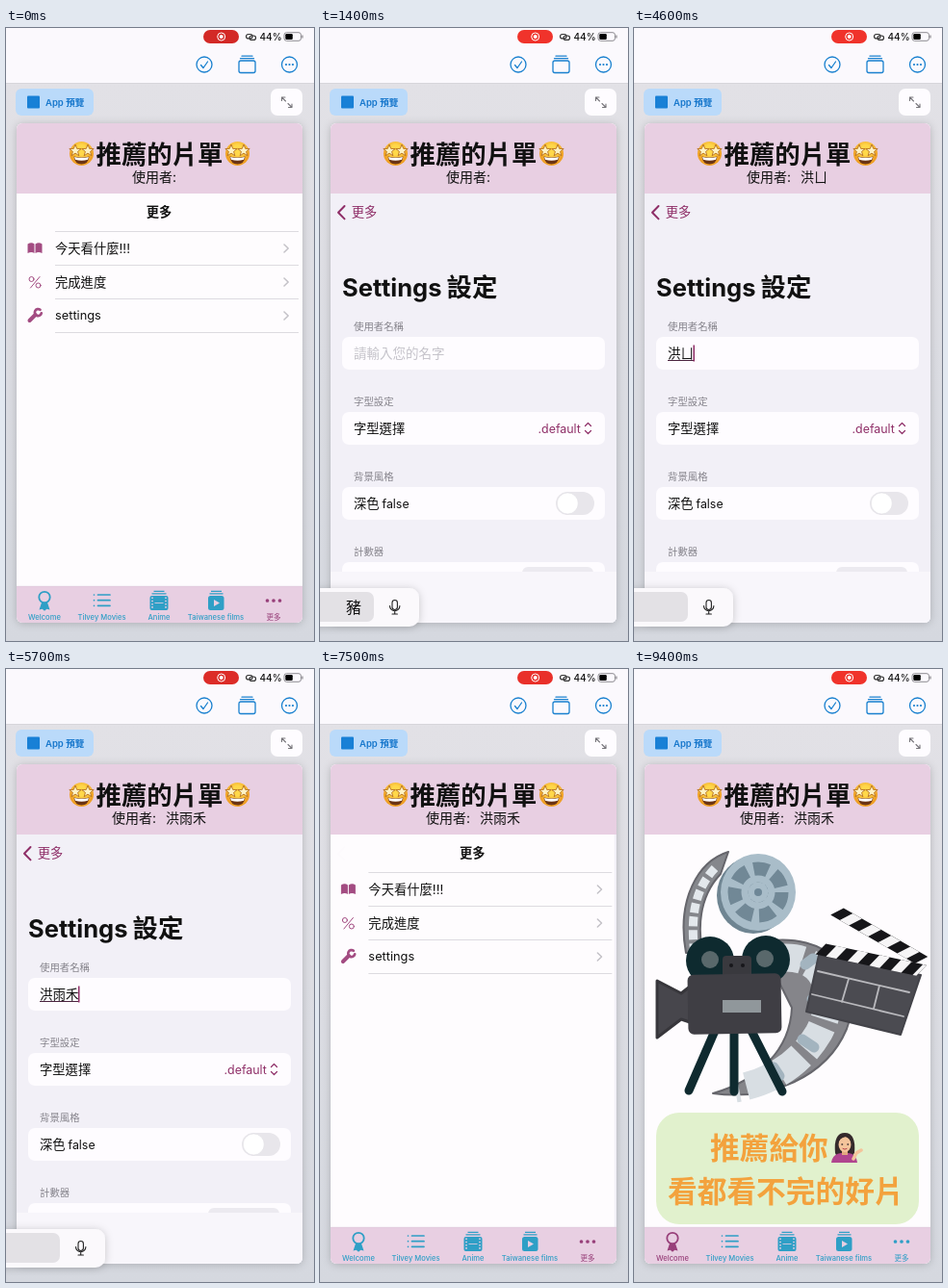
Animation, 320 px wide and 637 px high, one loop 9500 ms. Source, as an HTML page:

```html
<!DOCTYPE html>
<html lang="zh-Hant">
<head>
<meta charset="utf-8">
<title>App preview</title>
<style>
html, body { margin: 0; width: 100%; height: 100%; overflow: hidden; background: #fbf9fd; }
svg { display: block; width: 100%; height: 100%; }
text { font: 13.3px Inter, "Noto Sans CJK TC", "Noto Sans CJK", sans-serif; white-space: pre; fill: #111; }
.mid { text-anchor: middle; }
.line { stroke-linecap: round; stroke-linejoin: round; }
.line:not([fill]) { fill: none; }
.title { font-size: 26.4px; font-weight: 700; }
.label { font-size: 10.4px; fill: #85838b; }
.latin { font-size: 12.4px; }
.mauve { fill: #8f2f68; }
.tab text { font-size: 7.6px; font-weight: 500; fill: currentColor; text-anchor: middle; }
.tab { color: #2f9fc6; }
.tab.on { color: #98407a; }
.promo { font-size: 30.7px; font-weight: 700; fill: #f3a23d; }
.pick { font-size: 16px; }
</style>
</head>
<body>
<svg viewBox="0 0 320 637" preserveAspectRatio="none">
<defs>
  <linearGradient id="desk" x2="0" y2="1"><stop stop-color="#e2e1e6"/><stop offset="1" stop-color="#d5d8df"/></linearGradient>
  <radialGradient id="skin" cy=".35"><stop offset=".4" stop-color="#ffd84a"/><stop offset="1" stop-color="#f0a126"/></radialGradient>
  <filter id="soft" x="-20%" y="-20%" width="140%" height="140%"><feDropShadow dx="0" dy="1" stdDeviation="4" flood-opacity=".2"/></filter>
  <clipPath id="card"><rect x="11" y="99" width="297" height="519" rx="6"/></clipPath>
  <clipPath id="pickArea"><rect y="586" width="56" height="31"/></clipPath>
  <polygon id="star" points="0,-6.500 1.700,-2.100 6.200,-2 2.600,.9 3.800,5.200 0,2.600 -3.800,5.200 -2.600,.9 -6.200,-2 -1.700,-2.100" fill="#fff3c4" stroke="#b56f1d" stroke-width=".9"/>
  <g id="wow">
    <circle r="12.500" fill="url(#skin)"/>
    <path d="M-8 3Q0 5 8 3Q7 11 0 11Q-7 11-8 3Z" fill="#6b3413"/>
    <path d="M-7.400 3.400Q0 5.300 7.400 3.400L6.600 6.300Q0 8-6.600 6.300Z" fill="#fff"/>
    <use href="#star" x="-6.500" y="-3"/><use href="#star" x="6.500" y="-3"/>
  </g>
  <path id="next" d="M289 -4l4.200 4-4.200 4" class="line" stroke="#c3c1c7" stroke-width="1.500"/>
</defs>

<rect width="320" height="637" fill="#fbf9fd"/>
<rect y="57" width="320" height="580" fill="url(#desk)"/>
<rect y="57" width="320" height=".7" fill="#d3d1d7"/>

<rect id="rec" x="205" y="2" width="37" height="14" rx="7"/>
<circle cx="223.700" cy="9" r="4" fill="none" stroke="#fff"/><circle cx="223.700" cy="9" r="2" fill="#fff"/>
<g class="line" fill="none" stroke="#333" stroke-width="1.200"><rect x="249.500" y="6.500" width="6.500" height="4.400" rx="2.200"/><rect x="253" y="8" width="6.500" height="4.400" rx="2.200"/></g>
<text x="263.500" y="13" style="font-size:10px;font-weight:500">44%</text>
<rect x="289" y="4.700" width="17.500" height="8.600" rx="2.500" fill="none" stroke="#8e8c92"/>
<rect x="290.300" y="6" width="7.500" height="6" rx="1.200"/><path d="M308 7.500v3" stroke="#8e8c92" stroke-width="1.300"/>

<g class="line" stroke="#1880cf" stroke-width="1.300">
  <circle cx="206" cy="38" r="8"/><path d="M202.500 38.500l2.500 3 4.500-6.500"/>
  <rect x="242" y="34" width="17" height="12.500" rx="2"/><path d="M243.500 31.700h14M245 29.200h11"/>
  <circle cx="294.500" cy="38" r="8"/><path d="M291 38h0M294.500 38h0M298 38h0" stroke-width="2.200"/>
</g>
<rect x="10" y="63" width="81" height="28" rx="6" fill="#badafa"/>
<rect x="22" y="70.500" width="13" height="13" rx="1" fill="#1880d6"/>
<text x="41" y="81" style="font-size:9.500px;font-weight:600;fill:#1777cc">App 預覽</text>
<rect x="275" y="63" width="33" height="28" rx="7" fill="#fefcff"/>
<path class="line" d="M290.500 76l-4-4M286.500 75.500v-3.500h3.500M293 78.500l4 4M297 79v3.500h-3.500" stroke="#77757b" stroke-width="1.100"/>

<rect x="11" y="99" width="297" height="519" rx="6" fill="#fefcfe" filter="url(#soft)"/>
<g clip-path="url(#card)">
  <rect x="11" y="172" width="297" height="408" fill="#fefcfe"/>
  <g id="more">
    <path d="M51 211.500H304M51 246.500H304M51 281.500H304M51 316.500H304" stroke="#dddbe0"/>
    <text x="51" y="233.700">今天看什麼!!!</text><text x="51" y="268.700">完成進度</text>
    <text x="51" y="303.300" style="font-size:12.800px">settings</text>
    <use href="#next" y="229"/><use href="#next" y="264"/><use href="#next" y="299"/>
    <path d="M22.500 224.500q4-2.500 7 0v9.500q-3-2-7 0zM30.500 224.500q3.500-2.500 7 0v9.500q-4-2-7 0z" fill="#a34c82"/>
    <g class="line" stroke="#a34c82"><path d="M35 258.500l-9.500 11.500"/><circle cx="26.500" cy="261" r="2.500"/><circle cx="33.500" cy="267.500" r="2.500"/>
      <path d="M24.500 304l6-6" stroke-width="4"/><path d="M35.500 292.800a3.500 3.500 0 1 0 1.300 3.500" stroke-width="2.700"/></g>
  </g>
  <rect id="dim" x="11" y="172" width="297" height="408"/>

  <g id="settings">
    <rect x="11" y="172" width="297" height="446" fill="#f2f0f7"/>
    <text class="title" x="23" y="278.500"><tspan style="font-size:25.500px">Settings</tspan></text>
    <text class="title" x="131.500" y="278.500">設定</text>
    <g fill="#fefcff"><rect x="23" y="321" width="273" height="34" rx="7"/><rect x="23" y="399" width="273" height="34" rx="7"/>
      <rect x="23" y="477" width="273" height="34" rx="7"/><rect x="23" y="555" width="273" height="34" rx="7"/></g>
    <text class="label" x="35" y="313.700">使用者名稱</text><text class="label" x="35" y="391.700">字型設定</text>
    <text class="label" x="35" y="469.700">背景風格</text><text class="label" x="35" y="547.700">計數器</text>
    <text id="field" x="35" y="343"></text>
    <path id="mark" stroke="#4b2440"/>
    <rect id="caret" y="329.500" width="1.500" height="17" fill="#8f2f68"/>
    <text x="35" y="420.800">字型選擇</text><text class="mauve latin" x="226.500" y="420.500">.default</text>
    <path class="line" d="M275.500 413.500l3-3 3 3M275.500 418.500l3 3 3-3" stroke="#8f2f68" stroke-width="1.200"/>
    <text x="35" y="498.800">深色</text><text class="latin" x="64.500" y="498.500">false</text>
    <rect x="245" y="482" width="40" height="24" rx="12" fill="#e8e6eb"/><circle cx="257.300" cy="494" r="11" fill="#fff" stroke="#dad8de" stroke-width=".5"/>
    <rect x="210" y="560" width="74" height="24" rx="6" fill="#eceaf0"/>
  </g>
  <rect id="shade" x="11" y="565" width="297" height="53" fill="#f8f6fb"/>
  <g id="back">
    <path id="arrow" class="line" d="M25.500 185l-6.500 6.700 6.500 6.700" stroke="#8f2f68" stroke-width="2"/>
    <text id="backDark" class="mid" y="196" style="font-weight:600">更多</text><text id="backTint" class="mid mauve" y="196.300">更多</text>
  </g>

  <g id="welcome">
    <rect x="11" y="172" width="297" height="408" fill="#fefcfe"/>
    <g class="line">
      <path d="M98 190C66 200 44 240 54 295L71 295C65 260 72 232 90 213Z" fill="#85878c" stroke="#66666c" stroke-width="2"/>
      <path d="M84 207C64 228 58 256 63 296" stroke="#e3e8ec" stroke-width="9" stroke-dasharray="10 4" stroke-linecap="butt"/>
      <path d="M130 284C205 270 242 320 221 374C200 424 142 449 82 441C130 427 162 396 164 352Z" fill="#85858a" stroke="#66666c" stroke-width="2"/>
      <path d="M146 301C200 293 213 338 192 378C172 412 140 430 105 436" stroke="#d8dee3" stroke-width="29" stroke-dasharray="29 8" stroke-linecap="butt"/>
      <path d="M178 307l8-6M185 343l16 4M175 385l12 8M145 414l6 9" stroke="#a3b4bf" stroke-width="11"/>
    </g>
    <ellipse cx="124" cy="235" rx="38" ry="40" fill="#6f8592"/><ellipse cx="129" cy="232" rx="39" ry="40" fill="#a9bdc9"/>
    <circle cx="129" cy="232" r="21" fill="none" stroke="#718896" stroke-width="21" stroke-dasharray="13 5.850"/>
    <circle cx="129" cy="232" r="14" fill="none" stroke="#a9bdc9" stroke-width="7"/>
    <circle cx="129" cy="232" r="4" fill="#6e8797"/>
    <path class="line" d="M84 376L57 438M104 376V439M122 376L154 439" stroke="#0f2a2f" stroke-width="9"/>
    <path class="line" d="M24 324L49 337 58 330V367L49 364 24 383Z" fill="#47464c" stroke="#37363b" stroke-width="3"/>
    <circle cx="79" cy="303" r="25" fill="#0e2a2f"/><circle cx="137" cy="302" r="25" fill="#0e2a2f"/>
    <rect x="92" y="298" width="30" height="25" rx="4" fill="#39393e"/>
    <rect x="56" y="317" width="97" height="62" rx="6" fill="#3f3e44" transform="rotate(-1 104 348)"/>
    <g fill="#59686b"><circle cx="79" cy="302" r="9"/><circle cx="136" cy="301" r="9"/></g>
    <g fill="#17171b"><circle cx="101" cy="308" r="2"/><circle cx="113" cy="308" r="2"/></g>
    <rect x="92" y="344" width="40" height="13" fill="#90979b"/>
    <path class="line" d="M192 297L298 318 277 380 179 356Z" fill="#4b4b51" stroke="#434349" stroke-width="2"/>
    <path class="line" d="M191 314L286 336M185 338L280 361M223 322L216 346M255 329L249 353" stroke="#b9b9bd" stroke-width="1.800"/>
    <g id="clapper"></g>
    <rect x="23" y="461" width="273" height="116" rx="24" fill="#e1f1cd"/>
    <text class="promo" x="79" y="508.500">推薦給你</text><text class="promo" x="35" y="553.500">看都看不完的好片</text>
    <g transform="translate(219 497)">
      <path d="M-10 6Q-12-15 0-15 12-15 10 6L7 10H-8Z" fill="#352a2c"/>
      <path d="M-14 16Q-13 7-4 6H4Q12 7 13 16Z" fill="#b0458f"/>
      <rect x="-3" y="1" width="6" height="7" fill="#e3aa80"/><ellipse cy="-3" rx="6.500" ry="8" fill="#f4c49b"/>
      <path d="M-7-3Q-6-10 1-11 6-9 7-3L8-10 0-14-8-9Z" fill="#352a2c"/>
      <path class="line" d="M-3-3h.5M3-3h.5" stroke="#352a2c" stroke-width="1.500"/><path class="line" d="M-2 1.500q2 1.500 4 0" stroke="#b8434a"/>
      <path class="line" d="M9 12L12 6 17 3" stroke="#f4c49b" stroke-width="3.500"/>
    </g>
  </g>

  <g id="tabFill"><rect x="11" y="580" width="297" height="38" fill="#e8cfe2"/><path d="M11 580.200H308" stroke="#d9c4d5" stroke-width=".5"/></g>
  <g id="tabs">
    <g class="tab" id="tabHome"><path class="line" d="M37 597l-2.500 7.500 3.200-.8 2.300 2 2.300-2 3.200.8L43 597" fill="currentColor"/>
      <circle cx="40" cy="591.500" r="5.700" fill="none" stroke="currentColor" stroke-width="1.800"/><text x="40" y="614.700">Welcome</text></g>
    <g class="tab"><path class="line" d="M95.500 589H108M95.500 594.700H108M95.500 600.300H108M91.500 589h0M91.500 594.700h0M91.500 600.300h0" stroke="currentColor" stroke-width="1.700"/><text x="99.500" y="614.700">Tilvey Movies</text></g>
    <g class="tab"><path d="M153.500 585.300h11M151.500 587.900h15" stroke="currentColor" stroke-width="1.200"/><rect x="149.500" y="590" width="19" height="15" rx="2" fill="currentColor"/>
      <path d="M152 591.500v12M166 591.500v12" stroke="#e8cfe2" stroke-width="1.500" stroke-dasharray="1.600 1.600"/><path d="M154.500 597.500h9" stroke="#e8cfe2" stroke-width=".8"/><text x="159" y="614.700">Anime</text></g>
    <g class="tab"><path d="M213 585.300h11M211.500 587.900h14" stroke="currentColor" stroke-width="1.200"/><rect x="210" y="590" width="16.500" height="15" rx="2.500" fill="currentColor"/>
      <path d="M216 594l6 3.500-6 3.500z" fill="#e8cfe2"/><text x="218" y="614.700">Taiwanese films</text></g>
    <g class="tab" id="tabMore"><path class="line" d="M271.500 595h0M278 595h0M284.500 595h0" stroke="currentColor" stroke-width="3.700"/><text x="278" y="614.900">更多</text></g>
  </g>

  <rect x="11" y="99" width="297" height="73" fill="#e8cfe2"/>
  <use href="#wow" x="78.500" y="130.500"/><use href="#wow" x="240.500" y="130.500"/>
  <text class="title mid" x="159.500" y="140.500">推薦的片單</text>
  <text id="userLabel" y="160" style="font-size:14px">使用者:</text><text id="userName" y="160" style="font-size:14px"></text>
</g>

<g id="bar">
  <g id="barFill"><rect x="-20" y="582" width="123" height="40" rx="10" fill="#fbf9fc" filter="url(#soft)"/>
    <rect x="-10" y="586" width="66" height="31" rx="7" fill="#e3e1e5"/></g>
  <g clip-path="url(#pickArea)"><text id="pick1" class="pick" y="608"></text><text id="pick2" class="pick" x="41" y="608" fill-opacity=".7"></text></g>
  <rect x="75" y="594.500" width="5.400" height="10" rx="2.700" fill="none" stroke="#222" stroke-width="1.100"/>
  <path class="line" d="M72.500 600.500a5.200 5.200 0 0 0 10.400 0M77.700 606v3M75 609h5.400" stroke="#222" stroke-width="1.100"/>
</g>
</svg>
<script>
const LOOP = 9500, WIDTH = 297;
const $ = id => document.getElementById(id);
const set = (id, attrs) => { for (const k in attrs) $(id).setAttribute(k, attrs[k]); };
const write = (id, s) => { if ($(id).textContent !== s) $(id).textContent = s; };
const clamp = x => Math.min(1, Math.max(0, x));
const ramp = (t, start, length) => clamp((t - start) / length);
const ease = x => x < .5 ? 2 * x * x : 1 - 2 * (1 - x) ** 2;
const mix = (a, b, k) => a + (b - a) * k;

const typed = [[600, ''], [2400, 'ㄏ'], [3100, 'ㄏㄨ'], [3400, 'ㄏㄨㄥ'], [3800, '洪'], [4400, '洪ㄩ'],
  [4900, '洪雨'], [5200, '洪雨ㄏ'], [5400, '洪雨ㄏㄜ'], [5600, '洪雨禾'], [5800, '洪雨禾']];
const COMMIT = 5800;

// Striped clapper arms: x, y, angle, length
$('clapper').innerHTML = [[194, 291, 12, 107], [211, 252, 30, 101]].map(([x, y, angle, len]) =>
  `<g transform="translate(${x} ${y}) rotate(${angle}) skewX(-32)" stroke-width="13">
   <path d="M0 0H${len}" stroke="#161619"/><path d="M11 0H${len}" stroke="#f6f5f6" stroke-dasharray="11 12"/></g>`).join('');

function draw(t) {
  const glow = (1 - Math.cos(t * Math.PI / 1000)) / 2;
  $('rec').style.fill = `rgb(${mix(211, 255, glow)},${mix(41, 56, glow)},${mix(38, 46, glow)})`;

  const push = ease(ramp(t, 480, 500)) * (1 - ease(ramp(t, 7050, 480)));
  set('more', { transform: `translate(${-.29 * WIDTH * push} 0)` });
  set('dim', { opacity: .09 * push });
  set('settings', { transform: `translate(${WIDTH * (1 - push)} 0)` });
  set('shade', { opacity: clamp(push * 1.3) });
  const tabs = t < 4000 ? 1 - ramp(t, 600, 450) : ramp(t, 7100, 400);
  set('tabs', { opacity: tabs });
  set('tabFill', { opacity: tabs * tabs });

  const x = mix(46, 159, (1 - push) ** .9);
  set('backDark', { x, opacity: clamp(1 - push * 2) });
  set('backTint', { x, opacity: push });
  set('arrow', { opacity: push });
  set('back', { opacity: t >= 6900 && t < 7100 ? .25 : 1 });

  const [since, name] = typed.findLast(([at]) => at <= t) || [0, ''];
  const end = 35 + 13.5 * name.length, left = 131 - 7 * name.length;
  const composing = name && t < COMMIT;
  write('field', name || '請輸入您的名字');
  $('field').style.cssText = `font-size:13.5px;fill:${name ? '#111' : '#c5c3ca'}`;
  set('mark', { d: composing ? `M35 345.500H${end}` : '' });
  set('caret', { x: end - .5, opacity: (t - since) % 1000 < 600 ? 1 : 0 });
  set('userLabel', { x: left });
  set('userName', { x: left + 56 });
  write('userName', name);

  const leave = ramp(t, 7100, 300);
  set('bar', { opacity: ramp(t, 600, 200) * (1 - leave), transform: `translate(0 ${20 * leave})` });
  set('barFill', { opacity: ramp(t, 600, 350) });
  write('pick1', t < 2300 ? '豬' : t < COMMIT ? '' : '說');
  set('pick1', { x: t < 2300 ? 27 : -5 });
  write('pick2', t < COMMIT ? '' : '和');

  const home = t >= 7850;
  $('welcome').style.display = home ? '' : 'none';
  $('tabHome').classList.toggle('on', home);
  $('tabMore').classList.toggle('on', !home);
}

(function tick() {
  draw(performance.now() % LOOP);
  requestAnimationFrame(tick);
})();
</script>
</body>
</html>
```
